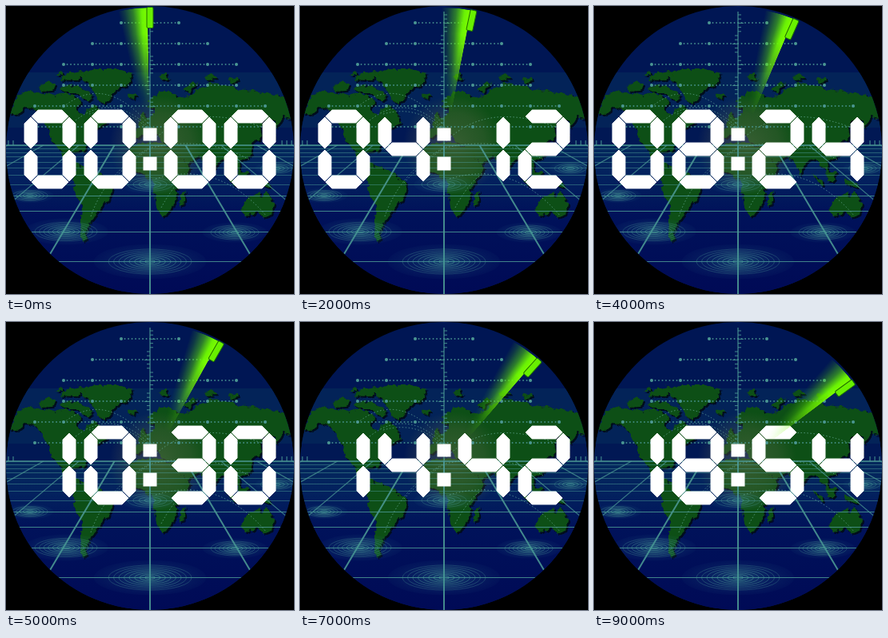
An HTML page for the animation above (10 s loop, 360 px wide and 360 px high).

```html
<!DOCTYPE html>
<html lang="en">
<head>
<meta charset="utf-8">
<title>Radar world clock</title>
<style>
  html, body { margin: 0; width: 100%; height: 100%; overflow: hidden; background: #000; }
  body { position: relative; }
  svg { display: block; position: absolute; left: 0; top: 0; width: 100%; height: 100%; }
  #beam {
    --angle: 0deg;
    position: absolute; inset: 2px; border-radius: 50%;
    background: conic-gradient(from calc(var(--angle) - 13deg), #6f00 0deg, #5cf00028 2.5deg, #62f50078 6deg, #70ff00f0 9.5deg, #7cff00 11.8deg, #6f00 12.1deg);
    -webkit-mask-image: radial-gradient(circle closest-side, #0000 27%, #0003 42%, #000a 62%, #000 82%);
    mask-image: radial-gradient(circle closest-side, #0000 27%, #0003 42%, #000a 62%, #000 82%);
  }
</style>
</head>
<body>
<svg viewBox="0 0 360 360">
  <defs>
    <clipPath id="dial"><circle cx="180" cy="180" r="180"/></clipPath>
    <linearGradient id="ground" x1="0" y1="0" x2="0" y2="1">
      <stop offset="0" stop-color="#04295c"/>
      <stop offset=".22" stop-color="#03215e"/>
      <stop offset=".45" stop-color="#00125a"/>
      <stop offset="1" stop-color="#000a56"/>
    </linearGradient>
    <radialGradient id="glow">
      <stop offset="0" stop-color="#3d9a9a" stop-opacity=".38"/>
      <stop offset=".6" stop-color="#2d7a90" stop-opacity=".14"/>
      <stop offset="1" stop-color="#2d7a90" stop-opacity=".04"/>
    </radialGradient>
    <radialGradient id="haze">
      <stop offset="0" stop-color="#73745a" stop-opacity=".42"/>
      <stop offset=".65" stop-color="#606a4c" stop-opacity=".27"/>
      <stop offset="1" stop-color="#606a4c" stop-opacity="0"/>
    </radialGradient>
    <filter id="coast" x="0" y="0" width="360" height="360" filterUnits="userSpaceOnUse">
      <feTurbulence type="fractalNoise" baseFrequency=".15" numOctaves="2" seed="4"/>
      <feDisplacementMap in="SourceGraphic" scale="8" xChannelSelector="R" yChannelSelector="G"/>
    </filter>
    <g id="land" filter="url(#coast)">
      <path d="M4 134L14 113 28 106 45 109 60 112 72 109 86 113 94 119 88 127 92 136 98 138 101 128 112 125 122 134 127 146 114 152 106 160 101 170 99 182 94 180 84 182 82 189 86 196 93 200 97 206 88 204 77 195 68 181 58 168 53 154 47 141 36 129 26 127 16 135Z"/>
      <path d="M88 86L110 79 140 79 159 85 152 99 138 105 128 118 121 123 112 110 104 99Z"/>
      <path d="M40 101L53 94 64 99 58 106 44 107ZM68 102L80 98 94 102 109 112 101 118 89 109 74 109ZM67 92L78 83 94 80 101 85 87 93ZM61 86L69 82 71 88ZM152 111L162 110 160 116 153 115Z"/>
      <path d="M89 204L100 201 112 206 122 214 134 221 132 232 124 246 114 256 108 268 101 278 99 293 93 289 94 268 95 250 86 232 84 218Z"/>
      <path d="M164 172L182 168 200 174 214 176 222 196 232 200 222 216 214 228 212 244 202 260 194 263 188 250 185 232 184 218 170 210 156 204 151 194 156 180ZM218 238L224 231 223 245 218 250Z"/>
      <path d="M160 166L160 156 168 152 166 146 176 140 186 134 184 126 177 127 179 118 192 107 206 107 216 116 230 111 240 104 256 97 276 99 290 104 310 106 330 110 350 114 359 128 356 140 346 138 338 152 334 144 322 142 318 152 320 164 308 172 306 188 292 194 294 210 284 200 276 190 264 196 258 212 250 194 240 188 226 200 216 184 210 174 196 172 190 160 176 160Z"/>
      <path d="M168 146L167 136 172 132 176 145ZM190 88L200 85 204 91 196 94ZM222 105L235 94 240 96 229 107ZM248 88L258 84 262 91 252 93ZM278 91L290 89 292 95 282 96ZM324 168L332 157 335 163 328 173Z"/>
      <path d="M294 251L304 239 316 233 320 240 325 230 335 247 332 261 322 266 314 257 298 263ZM342 282L351 270 353 276 344 286ZM273 210L288 222 284 225ZM290 209L302 207 299 219 292 219ZM311 215L329 222 332 228 317 224Z"/>
    </g>
  </defs>

  <g clip-path="url(#dial)">
    <path fill="#001654" d="M0 0h360v360H0z"/>
    <path fill="#032358" d="M0 83h360v69H0z"/>
    <path fill="#011854" d="M0 152h360v23H0z"/>
    <path fill="url(#ground)" d="M0 174h360v186H0z"/>
    <use href="#land" x="2" y="2" fill="#010a1e"/>
    <use href="#land" fill="#115012"/>
    <circle cx="191" cy="174" r="62" fill="url(#haze)"/>
    <g id="grid" fill="none" stroke="#4b9793"></g>
    <g fill="none" stroke="#73b9a9" stroke-width="1" stroke-dasharray="1.5 2.5" opacity=".65">
      <path d="M72 126Q125 82 184 154M87 143Q135 105 184 157M104 135Q150 122 184 160M106 263Q125 208 180 177M130 221Q155 194 180 178M180 172Q230 118 319 151M182 177Q250 162 304 192M187 216Q265 192 325 262M194 252Q216 212 233 209"/>
    </g>
  </g>
  <g id="digits" fill="#fff" stroke="#fff" stroke-width=".9"></g>
  <path fill="#fff" d="M171.500 152.500h17v16h-17zM171.500 188.500h17v17h-17z"/>
</svg>
<div id="beam"></div>
<svg viewBox="0 0 360 360">
  <rect id="grip" x="176" y="1.500" width="8" height="26" rx="1.500" fill="#68f000" stroke="#1f6c00"/>
</svg>

<script>
  const svgNS = "http://www.w3.org/2000/svg";
  const add = (parent, tag, attrs) => {
    const node = document.createElementNS(svgNS, tag);
    for (const key in attrs) node.setAttribute(key, attrs[key]);
    return parent.appendChild(node);
  };
  const byId = id => document.getElementById(id);
  const grid = byId("grid");
  const line = (d, opacity = 1, width = 1) => add(grid, "path", { d, opacity, "stroke-width": width });

  // Perspective floor
  const horizon = 174, vanish = 99;
  for (let i = 0; i < 12; i++) {
    const y = Math.floor(117 + 1 / (0.00493 + 0.00112 * i)) + 0.5;
    line(`M0 ${y}H360`, i > 3 ? 0.5 : 0.85);
  }
  for (let k = -8; k <= 8; k++) {
    const x = y => 180 + k * 0.592 * (y - vanish);
    const near = Math.abs(k) < 2;
    line(`M${x(horizon)} ${horizon}L${x(360)} 360`, near ? 0.9 : 0.75, near ? 2 : 1.2);
  }
  line(`M0 ${horizon}H360`, 0.9, 1.3);
  for (let x = 3; x < 360; x += 6) if (x < 14 || x > 340) line(`M${x} 168V174`);

  // Ripples
  const ripple = (cx, cy, rx, rings) => {
    add(grid, "ellipse", { cx, cy, rx: rx * 1.35, ry: rx * 0.42, fill: "url(#glow)", stroke: "none" });
    for (let i = 1; i <= rings; i++) {
      const r = rx * i / rings;
      add(grid, "ellipse", { cx, cy, rx: r, ry: r * 0.3, opacity: 0.85 - 0.45 * i / rings, "stroke-width": 0.8 });
    }
  };
  ripple(180, 319.5, 52, 8);
  ripple(75, 282, 39, 7);
  ripple(286, 283, 30, 6);
  ripple(30, 237, 22, 5);
  ripple(180, 223, 28, 4);
  ripple(338, 203, 20, 4);

  // Vertical scale and dotted rows
  line("M180 7V180", 0.85, 1.3);
  for (let i = 0; i < 31; i++) {
    const y = 11 + i * 5.2, long = i % 5 === 2;
    const side = Math.floor(i / 5) % 2 ? -1 : 1;
    line(`M180 ${y}h${side * (long ? 7 : 4)}`, 0.9);
  }
  [1, 2, 3, 3, 4, 4].forEach((reach, row) => {
    const y = 21 + row * 26, span = reach * 36;
    add(grid, "path", {
      d: `M${180 - span} ${y}H${180 + span}`, "stroke-width": 1.8,
      "stroke-linecap": "round", "stroke-dasharray": "0.1 4.4", opacity: 0.85
    });
    for (let k = -reach; k <= reach; k++)
      if (k) add(grid, "circle", { cx: 180 + k * 36, cy: y, r: 2, fill: "#4b9793", stroke: "none" });
  });

  // Seven-segment display, segments a to g
  const bar = y => `M9 ${y + 8}l8-8h30l8 8-8 8H17z`;
  const post = (x, y) => `M${x + 8} ${y}l8 8v23l-8 8-8-8v-23z`;
  const shapes = [bar(0), post(48, 9), post(48, 50), bar(82), post(0, 50), post(0, 9), bar(41)];
  const lit = ["abcdef", "bc", "abdeg", "abcdg", "bcfg", "acdfg", "acdefg", "abc", "abcdefg", "abcdfg"];
  const digits = [23, 98, 198, 273].map(x =>
    add(byId("digits"), "path", { transform: `translate(${x} 130)` }));
  const pad = n => String(n).padStart(2, "0");

  let shown = -1;
  function draw() {
    const step = Math.floor(performance.now() % 10000 / 1000);
    if (step !== shown) {
      shown = step;
      const text = pad(step * 2) + pad(step * 6);
      digits.forEach((digit, i) =>
        digit.setAttribute("d", [...lit[text[i]]].map(s => shapes["abcdefg".indexOf(s)]).join("")));
      byId("grip").setAttribute("transform", `rotate(${step * 6} 180 180)`);
      byId("beam").style.setProperty("--angle", `${step * 6}deg`);
    }
    requestAnimationFrame(draw);
  }
  draw();
</script>
</body>
</html>
```
